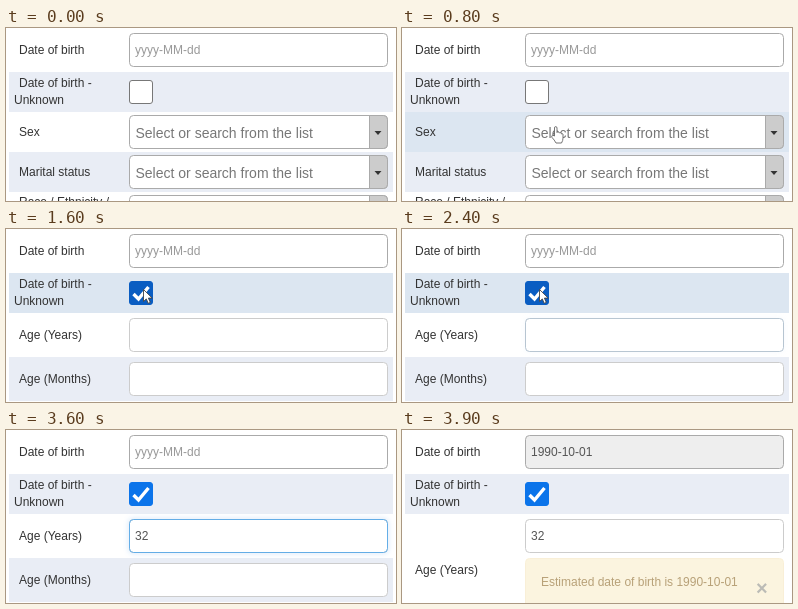
An HTML page that plays this animation: 390x173 px, repeating every 5500 ms.

```html
<!DOCTYPE html>
<html lang="en">
<head>
<meta charset="utf-8">
<title>Estimated date of birth</title>
<style>
  html, body { margin: 0; width: 100%; height: 100%; overflow: hidden; background: #fff; }
  svg { display: block; }
  text { font: 12px "Liberation Sans", Arial, sans-serif; fill: #333; white-space: pre; }
  .hint { fill: #999; }
  .choice { font-size: 14px; fill: #777; }
  .value { fill: #555; }
  .note { fill: #8a6420; }
  .close { font-size: 20px; font-weight: bold; fill: #8f8f86; }
</style>
</head>
<body>
<svg id="stage" width="390" height="173" viewBox="0 0 390 173"></svg>
<script>
const LOOP = 5500;
const STRIPE = '#e9edf5', HOVER = '#dce6f1';

// Each step changes part of the state. hover: row index; cursor: [shape, x, y].
const steps = [
  [0,    { view: 'selects', hover: -1, cursor: null, over: false, checked: false,
           ring: 0, age: '', born: '', note: 0 }],
  [600,  { hover: 3, cursor: ['hand', 170, 146] }],
  [700,  { hover: 2, cursor: ['hand', 161, 114] }],
  [800,  { cursor: ['hand', 149, 98] }],
  [900,  { hover: 1, cursor: ['arrow', 141, 74], over: true }],
  [1000, { cursor: ['arrow', 136, 59] }],
  [1600, { view: 'ages', checked: true, cursor: ['arrow', 137, 60] }],
  [2400, { ring: 0.2 }],
  [2500, { ring: 0.6 }],
  [2600, { ring: 0.9 }],
  [2700, { ring: 1 }],
  [2900, { cursor: ['arrow', 142.5, 53] }],
  [3000, { cursor: ['arrow', 157, 46], over: false }],
  [3100, { hover: -1, cursor: null }],
  [3600, { age: '32' }],
  [3800, { view: 'estimate', ring: 0.4, born: '1990-10-01', note: 0.25 }],
  [3900, { ring: 0, note: 0.6 }]
];

// Top and bottom edge of each table row
const rows = {
  selects: [[3, 44], [44, 84], [84, 124], [124, 164], [164, 180]],
  ages: [[3, 44], [44, 84], [84, 128], [128, 172]],
  estimate: [[3, 44], [44, 84], [84, 180]]
};

const cursors = {
  arrow: `<path d="M.5 .5V12.5L3.3 9.9 5.2 14.3 7.3 13.4 5.4 9.1H9.2Z"
    fill="#fff" stroke="#444" stroke-width=".9"/>`,
  hand: `<path d="M3.5 10V2Q3.5 .6 4.7 .6T6 2V6.5Q6.2 5.5 7.2 5.8T8.3 7Q8.8 6.3 9.6 6.7T10.5 8
    Q11.2 7.3 12 8V12Q12 14.5 10.5 17H5Q3.5 14 .8 11.2 .3 9.5 1.8 9.2Z"
    fill="#fff" stroke="#666" stroke-width=".9"/>`
};

const text = (x, y, words, kind = '') => `<text x="${x}" y="${y}" class="${kind}">${words}</text>`;

const box = (y, height, stroke, fill = '#fff', extra = '') =>
  `<rect x="123.5" y="${y + 0.5}" width="258" height="${height - 1}" rx="4"
    fill="${fill}" stroke="${stroke}" ${extra}/>`;

const select = y => box(y, 34, '#aaa') +
  `<path d="M363.5 ${y + 0.5}H377.5Q381.5 ${y + 0.5} 381.5 ${y + 4.5}V${y + 29.5}
    Q381.5 ${y + 33.5} 377.5 ${y + 33.5}H363.5Z" fill="#ccc" stroke="#aaa"/>
  <path d="M368.5 ${y + 16}h7l-3.5 4z" fill="#333"/>` +
  text(129.5, y + 23, 'Select or search from the list', 'choice');

function ageBox(s) {
  const glow = s.ring && box(89, 34, '#52a8ec', '#fff', `opacity="${s.ring}" filter="url(#glow)"`);
  const edge = s.ring && box(89, 34, '#52a8ec', 'none', `stroke-opacity="${0.85 * s.ring}"`);
  return (glow || '') + box(89, 34, '#ccc') + (edge || '') + text(129, 110, s.age, 'value');
}

function checkbox(s) {
  const blue = s.over ? '#0a5dc2' : '#0b74ea';
  const [fill, stroke] = s.checked ? [blue, blue] : ['#fff', s.over ? '#555' : '#777'];
  return `<rect x="123.5" y="52.5" width="23" height="23" rx="2.5" fill="${fill}" stroke="${stroke}"/>` +
    (s.checked ? '<path d="M127.5 65l5 5 10-12" fill="none" stroke="#fff" stroke-width="3.4"/>' : '');
}

const views = {
  selects: () => text(13, 108, 'Sex') + select(87) +
    text(13, 148, 'Marital status') + select(127) +
    text(13, 178, 'Race / Ethnicity /') + select(167),
  ages: s => text(13, 110, 'Age (Years)') + ageBox(s) +
    text(13, 154, 'Age (Months)') + box(133, 34, '#ccc'),
  estimate: s => text(13, 144, 'Age (Years)') + ageBox(s) +
    `<g opacity="${s.note}">${box(128, 60, '#f6e6bd', '#f9eecb')}
    ${text(139, 156, 'Estimated date of birth is 1990-10-01', 'note')}
    ${text(354, 165, '×', 'close')}</g>`
};

function stripes(s) {
  return rows[s.view].map(([top, bottom], i) => {
    const fill = i === s.hover ? HOVER : i % 2 ? STRIPE : '#fff';
    return `<rect x="3" y="${top}" width="384" height="${bottom - top}" fill="${fill}"/>`;
  }).join('');
}

function draw(s) {
  const [shape, x, y] = s.cursor || [];
  return `<defs><filter id="glow" x="-10%" y="-50%" width="120%" height="200%">
      <feGaussianBlur stdDeviation="2.5"/></filter></defs>` +
    stripes(s) +
    text(13, 26, 'Date of birth') +
    box(5, 34, '#aaa', s.born ? '#eee' : '#fff') +
    text(129, 26, s.born || 'yyyy-MM-dd', s.born ? 'value' : 'hint') +
    text(13, 59, 'Date of birth -') + text(8, 76, 'Unknown') +
    checkbox(s) + views[s.view](s) +
    (shape ? `<g transform="translate(${x} ${y})">${cursors[shape]}</g>` : '');
}

const stage = document.getElementById('stage');
const start = performance.now();
let shown = -1;

function tick() {
  const time = (performance.now() - start) % LOOP;
  const past = steps.filter(([at]) => at <= time);
  if (past.length !== shown) {
    shown = past.length;
    stage.innerHTML = draw(Object.assign({}, ...past.map(([, change]) => change)));
  }
  requestAnimationFrame(tick);
}
tick();
</script>
</body>
</html>
```
